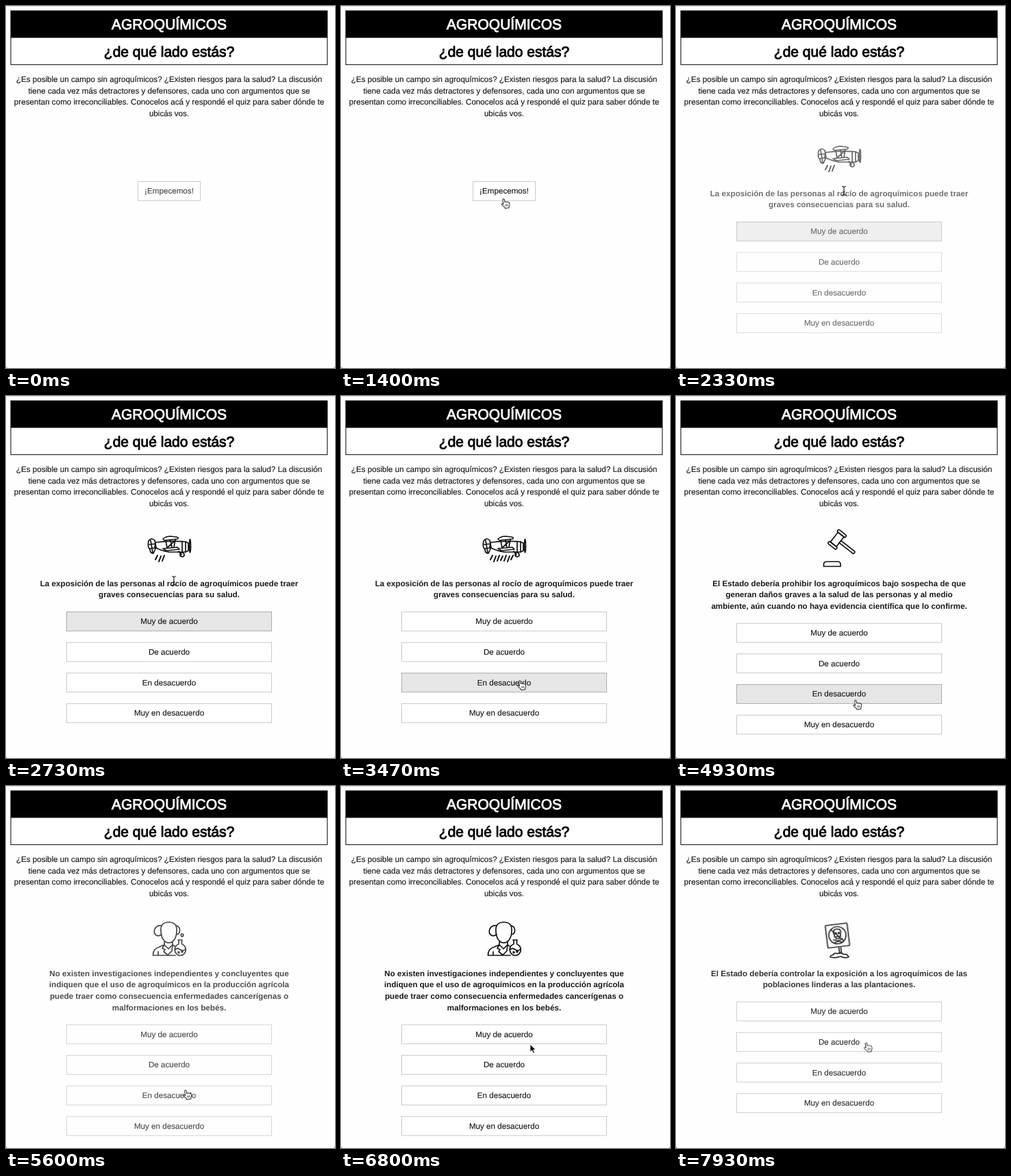
Animation, 480 px wide and 529 px high, one loop 8 s. Source, as an HTML page:

```html
<!DOCTYPE html>
<html lang="es">
<head>
<meta charset="utf-8">
<style>
  html, body { margin: 0; width: 100%; height: 100%; overflow: hidden; background: #fff; }
  svg { display: block; width: 100vw; height: 100vh; }
  text {
    font-family: "Liberation Sans", Arial, sans-serif; font-size: 11.65px; text-anchor: middle;
    text-rendering: geometricPrecision; fill: #1a1a1a; stroke: #1a1a1a; stroke-width: .15px;
  }
  .head { font-size: 21px; stroke-width: .85px; }
  .ask { font-weight: bold; stroke: none; }
  .icon { fill: none; stroke: #111; stroke-width: 1.7; stroke-linejoin: round; stroke-linecap: round; }
  .btn rect { fill: #fff; stroke: #c9c9ce; }
  .btn.hot rect { fill: #e6e6e6; stroke: #adadad; }
</style>
</head>
<body>
<svg id="stage" viewBox="0 0 480 529"></svg>
<script>
const LOOP = 8000, MID = 238;
const stage = document.getElementById('stage');
const OPTIONS = ['Muy de acuerdo', 'De acuerdo', 'En desacuerdo', 'Muy en desacuerdo'];

const label = (s, y, cls = '') => `<text x="${MID}" y="${y}" class="${cls}">${s}</text>`;
const lines = (list, y, cls) => list.map((s, i) => label(s, y + i * 16.7, cls)).join('');
const button = (s, x, y, w) =>
  `<g class="btn"><rect x="${x}" y="${y}" width="${w}" height="27.8"/>${label(s, y + 17.8)}</g>`;
const path = (d, extra = '') => `<path d="${d}" ${extra}/>`;

const drops = Array.from({ length: 7 }, (_, i) => {
  const x = 221 + i * 5, y = 233 + (i % 2);
  return path(`M${x} ${y}l-3 ${i % 3 ? 8 : 6}`, 'class="drop" stroke-width="2"');
}).join('');

const plane =
  path('M218 214Q240 211 262 213L266 215V226L262 228H238Q226 226 217 221Z') +
  path('M229 209Q233 205 240 205L249 206Q253 207 250 209L231 211Z') +
  path('M229 223L250 221L253 224L234 226Z') +
  path('M208 212Q212 206 217 211L219 221L215 230Q210 230 210 224Q206 221 208 212ZM211 211L214 229M209 217L218 216M210 223L218 222') +
  path('M233 211L235 222M247 210L245 221M236 221L247 211M240 211L242 221M257 213V228M262 213V228M266 220H269M252 227L256 232') +
  '<ellipse cx="268.5" cy="219" rx="1" ry="10"/><circle cx="257" cy="232" r="3"/>' + drops;

const gavel =
  path('M215.5 249V246Q215.5 242 220 242H236Q240 242 240 246V249Z') +
  `<g id="gavel"><g transform="translate(231 216) rotate(25)">
    <rect x="-5.5" y="-9" width="11" height="18"/>
    <rect x="-7.5" y="-13" width="15" height="4" rx="1.5"/>
    <rect x="-7.5" y="9" width="15" height="4" rx="1.5"/>
    <path d="M5.5 -2H31Q33 0 31 2H5.5"/></g></g>`;

const scientist =
  path('M226 212Q225 199 237.5 199T249 212Q249 223 242 228Q237.5 230.5 233 228Q226 223 226 212Z') +
  path('M227 204Q220 203 217 209Q215 215 219 218Q223 220 227 217M248 204Q253 205 253.5 210Q254 216 249 217') +
  path('M214.5 247.5Q214 238 224 235L231 232V228M243 228V232L246 234M214.5 247.5H247M231 232L228 237L232 239L230 242L236 247L242 241L243 232M231 232L237 238L243 232M222 242V247') +
  path('M251 225H257M252 225V231A8 8.5 0 1 0 256.5 231V225M247 239Q250 236 254 239T261 239') +
  '<circle cx="252" cy="243" r="1"/><circle cx="257" cy="242" r="1"/><circle id="bubble" cx="257" cy="218" r="1.8"/>';

const sign =
  `<g transform="rotate(-7 236 218)"><rect x="219.5" y="202" width="32" height="33" rx="1"/>
    <circle cx="235.5" cy="218" r="12.5"/>
    <path d="M231 220V217Q228 209 235.5 209T240 217V220H231ZM233 220V223H238V220M229 224L242 229M242 224L229 229"/>
    <circle cx="233.3" cy="215" r="1"/><circle cx="237.8" cy="215" r="1"/>
    <path d="M227 209L244 227"/></g>` +
  path('M237.5 236L239 245M240.5 236L241.5 245') +
  path('M225 250Q225 247 229 247Q231 243 236 245Q241 242 244 246Q250 245 252 250Q246 252 240 249Q232 252 225 250Z');

// wake: when the pointer first moves over the question; idle: button lit before that
const scenes = [
  { at: 2000, fade: 2020, wake: 2870, idle: 0, icon: plane, ask: [
    'La exposición de las personas al rocío de agroquímicos puede traer',
    'graves consecuencias para su salud.'] },
  { at: 3530, fade: 3770, wake: 4200, icon: gavel, ask: [
    'El Estado debería prohibir los agroquímicos bajo sospecha de que',
    'generan daños graves a la salud de las personas y al medio',
    'ambiente, aún cuando no haya evidencia científica que lo confirme.'] },
  { at: 5070, fade: 5215, wake: 5870, icon: scientist, ask: [
    'No existen investigaciones independientes y concluyentes que',
    'indiquen que el uso de agroquímicos en la producción agrícola',
    'puede traer como consecuencia enfermedades cancerígenas o',
    'malformaciones en los bebés.'] },
  { at: 7330, fade: 7485, wake: LOOP, icon: sign, ask: [
    'El Estado debería controlar la exposición a los agroquímicos de las',
    'poblaciones linderas a las plantaciones.'] }
];

const buttonTop = (scene, i) => 315.5 + (scene.ask.length - 2) * 16.7 + i * 44.7;

const question = s => `<g class="scene"><g class="icon">${s.icon}</g>${lines(s.ask, 277.5, 'ask')}${
  OPTIONS.map((o, i) => button(o, 88.5, buttonTop(s, i), 299)).join('')}</g>`;

stage.innerHTML =
  `<rect width="480" height="529" fill="#8a8a8a"/>
  <path d="M0 1H480V526Q480 529 477 529H3Q0 529 0 526Z" fill="#fefefe"/>
  <path d="M0 .5H480" stroke="#ddd"/>
  <rect x="6.5" y="6.5" width="462.8" height="39.5" fill="#000"/>
  <rect x="7" y="46" width="461.8" height="39.7" fill="#fff" stroke="#000"/>
  <text x="${MID}" y="34" class="head" style="fill:#fff;stroke:#fff">AGROQUÍMICOS</text>
  <text x="${MID}" y="73.8" class="head" style="fill:#000;stroke:#000">¿de qué lado estás?</text>` +
  lines([
    '¿Es posible un campo sin agroquímicos? ¿Existen riesgos para la salud? La discusión',
    'tiene cada vez más detractores y defensores, cada uno con argumentos que se',
    'presentan como irreconciliables. Conocelos acá y respondé el quiz para saber dónde te',
    'ubicás vos.'], 111) +
  `<g id="intro">${button('¡Empecemos!', 192.5, 256.5, 91)}</g>` +
  scenes.map(question).join('') +
  `<g id="pointer">
    <path id="arrow" d="M0 0V11L2.6 8.7L4.5 13L6.4 12.2L4.6 8H8Z" fill="#000" stroke="#fff" stroke-width=".8"/>
    <g id="hand" transform="translate(.6 -.6) rotate(-8) scale(.95 1)" fill="#fff" stroke="#222" stroke-width="1" stroke-linejoin="round">
      <path d="M-1.2 6V1Q0 -1 1.3 1V5Q3 4 4 5.4Q5.6 4.6 6.4 6Q8.2 5.6 8.3 7.5Q8.4 11 6.8 12.5V14H.4V12.8L-3.6 8.4Q-4.2 6.4 -2.4 6.6L-1.2 8Z"/>
      <path d="M1.8 8.5V11.5M3.6 8.5V11.5M5.4 8.5V11.5" stroke-width=".7"/></g>
    <path id="beam" d="M-3 -6.5Q0 -6.5 0 -4.5Q0 -6.5 3 -6.5M0 -4.5V4.5M-3 6.5Q0 6.5 0 4.5Q0 6.5 3 6.5M-1.5 1.5H1.5" fill="none" stroke="#222" stroke-width="1.2"/>
  </g>`;

const $ = id => document.getElementById(id);
const show = (node, on) => node.setAttribute('visibility', on ? 'inherit' : 'hidden');
const groups = [...document.querySelectorAll('.scene')];
const dropNodes = [...document.querySelectorAll('.drop')];
const introText = $('intro').querySelector('text');

const route = [
  [1070, 256, 482], [1270, 232, 360], [1470, 238, 253], [1670, 245, 270],
  [2870, 245, 270], [3330, 260, 416.5], [4200, 260, 416.5], [4600, 261, 445],
  [5870, 261, 445], [6130, 265, 422], [6270, 265, 422], [6730, 276, 377.5],
  [6870, 276, 377.5], [6930, 276.5, 375.5], [LOOP, 276.5, 375.5]
];

function pointerAt(t) {
  const i = Math.max(1, route.findIndex(p => p[0] >= t));
  const [t0, x0, y0] = route[i - 1], [t1, x1, y1] = route[i];
  const p = Math.min(1, Math.max(0, (t - t0) / (t1 - t0)));
  const e = p * p * (3 - 2 * p);
  return [x0 + (x1 - x0) * e, y0 + (y1 - y0) * e];
}

function drawPointer(t, x, y, over, onText) {
  show($('pointer'), t >= 1070);
  $('pointer').setAttribute('transform', `translate(${x} ${y})`);
  show($('hand'), over);
  show($('beam'), onText);
  show($('arrow'), !over && !onText);
}

function drawIcons(t) {
  const count = t < 2870 ? 3 : Math.min(7, 3 + Math.floor((t - 2800) / 130));
  dropNodes.forEach((d, i) => show(d, i < count));
  const raised = (t >= 4300 && t < 4470) || t >= 4930;
  const angle = raised ? 13 : t >= 4800 ? -8 : 0;
  $('gavel').setAttribute('transform', `rotate(${angle} 261 231)`);
  const phase = (t - 5600 + 1470) % 1470;
  show($('bubble'), phase < 670);
  $('bubble').setAttribute('cy', phase < 270 ? 218 : phase < 530 ? 211 : 204);
}

function render(t) {
  const now = scenes.filter(s => t >= s.at).length - 1;
  const [x, y] = pointerAt(t);
  let over = false, onText = false;

  show($('intro'), now < 0);
  introText.setAttribute('opacity', Math.min(1, .8 + Math.max(0, t - 50) / 400));
  if (now < 0) over = y >= 256 && y <= 284;

  groups.forEach((g, k) => {
    show(g, k === now);
    if (k !== now) return;
    const s = scenes[k];
    g.setAttribute('opacity', Math.min(1, Math.max(0, (t - s.fade) / 500)));
    const hit = OPTIONS.findIndex((_, i) => y >= buttonTop(s, i) && y <= buttonTop(s, i) + 28);
    over = t >= s.fade && hit >= 0;
    onText = y > 265 && y < 267 + s.ask.length * 16.7;
    const lit = t < s.wake ? s.idle : hit;
    g.querySelectorAll('.btn').forEach((b, i) => b.classList.toggle('hot', i === lit));
  });

  drawIcons(t);
  drawPointer(t, x, y, over, onText);
}

const start = performance.now();
function tick() {
  render((performance.now() - start) % LOOP);
  requestAnimationFrame(tick);
}
render(0);
requestAnimationFrame(tick);
</script>
</body>
</html>
```
